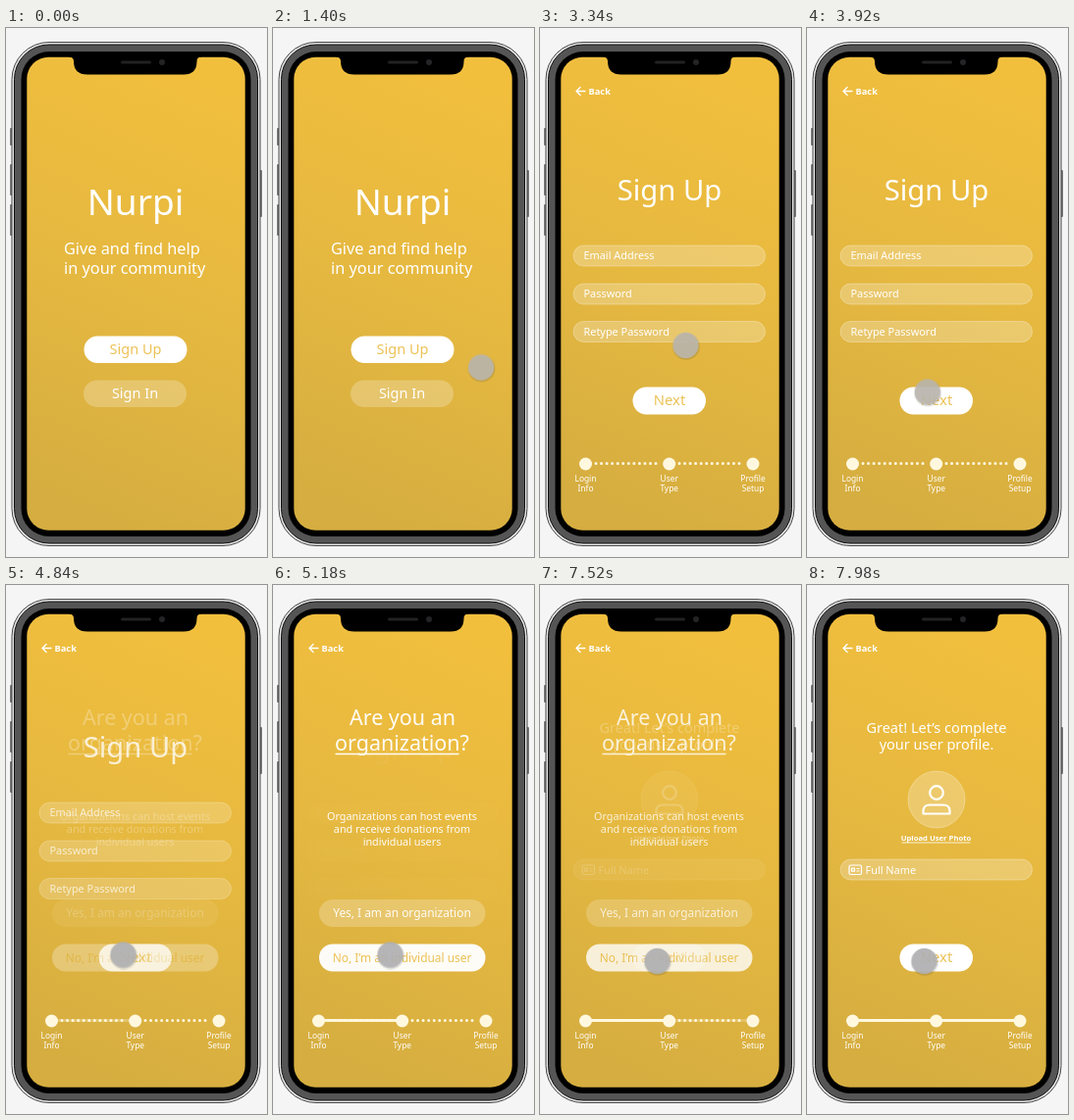
Animation of 266x540 px, one loop 8000 ms. Source, as an HTML page:

```html
<!DOCTYPE html>
<html lang="en">
<head>
<meta charset="utf-8">
<title>Sign-up flow</title>
<style>
  html, body { margin: 0; width: 100%; height: 100%; overflow: hidden; background: #f5f5f5; }
  svg { display: block; width: 100vw; height: 100vh; }
  text { font-family: "Noto Sans", sans-serif; fill: #fff; }
  .mid text, text.mid { text-anchor: middle; }
  .bold { font-family: "Open Sans", sans-serif; font-weight: 700; }
  text.gold { fill: #ecc255; }
  .solid { fill: #fff; }
  .soft { fill: #fff; fill-opacity: .24; }
  .field { fill: #fff; fill-opacity: .24; stroke: #fff; stroke-opacity: .38; stroke-width: .8; }
  .line { fill: none; stroke: #fff; stroke-linecap: round; stroke-linejoin: round; }
  .track { stroke: #fff8df; stroke-width: 3; stroke-linecap: round; }
  .dots { stroke-dasharray: 0 5.55; }

  .anim { animation: 8s linear infinite; }
  #welcome { animation-name: welcome; }
  #account { animation-name: account; }
  #kind { animation-name: kind; }
  #profile { animation-name: profile; }
  #nav { animation-name: nav; }
  #bar1 { animation-name: bar1; }
  #cursor { animation-name: move; }
  #cursor circle { animation-name: press; }

  @keyframes welcome { 0%, 26.875% { opacity: 1 } 30% { opacity: .6 } 33.125%, 100% { opacity: 0 } }
  @keyframes account {
    0%, 26.875% { opacity: 0 } 33.125%, 58.75% { opacity: 1 }
    61.875% { opacity: .6 } 65%, 100% { opacity: 0 }
  }
  @keyframes kind {
    0%, 58.75% { opacity: 0 } 65%, 92.5% { opacity: 1 }
    95.625% { opacity: .6 } 98.75%, 100% { opacity: 0 }
  }
  @keyframes profile { 0%, 92.5% { opacity: 0 } 98.75%, 100% { opacity: 1 } }
  @keyframes nav { 0%, 26.875% { opacity: 0 } 33.125%, 100% { opacity: 1 } }
  @keyframes bar1 { 0%, 58.75% { opacity: 0 } 65%, 100% { opacity: 1 } }
  @keyframes move {
    0%, 13.5% { transform: translate(284px, 372px); animation-timing-function: ease-in-out }
    21.25%, 43.75% { transform: translate(148.5px, 324px); animation-timing-function: ease-in-out }
    50.6%, 85% { transform: translate(119.5px, 377.5px); animation-timing-function: ease-in-out }
    90%, 100% { transform: translate(119.5px, 384px) }
  }
  @keyframes press {
    0%, 26% { fill: #bab6ae } 27.5%, 33% { fill: #b0b0b2 }
    36%, 57.5% { fill: #bab6ae } 59%, 100% { fill: #b0b0b2 }
  }
</style>
</head>
<body>
<svg viewBox="0 0 266 540" preserveAspectRatio="none">
  <defs>
    <linearGradient id="gold" x1=".6" y1="0" x2=".4" y2="1">
      <stop offset="0" stop-color="#f2bf3d"/>
      <stop offset=".5" stop-color="#e5b840"/>
      <stop offset="1" stop-color="#d5ad40"/>
    </linearGradient>
  </defs>

  <!-- Phone -->
  <g fill="#777">
    <rect x="4" y="102" width="3" height="18" rx="1"/>
    <rect x="4" y="139" width="3" height="32" rx="1"/>
    <rect x="4" y="180" width="3" height="32" rx="1"/>
    <rect x="258" y="145" width="3" height="48" rx="1"/>
  </g>
  <rect x="6" y="14.5" width="253" height="514" rx="38" fill="#e4e4e4" stroke="#444"/>
  <rect x="8.5" y="17" width="248" height="509" rx="35.5" fill="#555" stroke="#111"/>
  <rect x="15.5" y="24" width="234" height="495" rx="28.5"/>
  <rect x="21.3" y="29.8" width="222.4" height="482.9" rx="22"/>
  <rect x="21.3" y="29.8" width="222.4" height="482.9" rx="22" fill="url(#gold)"/>
  <path d="M64 28.5V29.5Q69 29.5 69 34Q69 47.5 83 47.5H181Q194.5 47.5 194.5 34Q194.5 29.5 199 29.5V28.5Z"/>
  <rect x="117" y="33.5" width="31" height="3" rx="1.5" fill="#222"/>
  <circle cx="159" cy="35" r="3" fill="#242426"/>

  <g id="welcome" class="anim">
    <text class="mid" x="132" y="191" font-size="37">Nurpi</text>
    <g font-size="16.3">
      <text x="59" y="231">Give and find help</text>
      <text x="59" y="250.5">in your community</text>
    </g>
    <rect class="solid" x="79.5" y="314.5" width="105" height="27.5" rx="13.75"/>
    <rect class="soft" x="79" y="359.5" width="105" height="27.5" rx="13.75"/>
    <g class="mid" font-size="14.5">
      <text class="gold" x="132" y="333">Sign Up</text>
      <text x="131.5" y="378">Sign In</text>
    </g>
  </g>

  <g id="nav" class="anim">
    <path class="line" stroke-width="1.4" d="M46 64.5H37M41 60.5L37 64.5L41 68.5"/>
    <text class="bold" x="49.5" y="68" font-size="9.3">Back</text>
    <path class="track dots" d="M57 444.5H122M142 444.5H208"/>
    <path id="bar1" class="track anim" d="M46.5 444.5H131.5"/>
    <g fill="#fff8df">
      <circle cx="46.5" cy="445" r="6.5"/>
      <circle cx="131.7" cy="445" r="6.5"/>
      <circle cx="217" cy="445" r="6.5"/>
    </g>
    <g class="mid" font-size="8.4">
      <text x="46.5" y="463">Login</text><text x="46.5" y="472.5">Info</text>
      <text x="131.7" y="463">User</text><text x="131.7" y="472.5">Type</text>
      <text x="217" y="463">Profile</text><text x="217" y="472.5">Setup</text>
    </g>
  </g>

  <g id="account" class="anim">
    <text class="mid" x="132" y="176" font-size="29.2">Sign Up</text>
    <rect class="field" x="34" y="222" width="195.5" height="21" rx="10.5"/>
    <rect class="field" x="34" y="261" width="195.5" height="21" rx="10.5"/>
    <rect class="field" x="34" y="299.5" width="195.5" height="21" rx="10.5"/>
    <g font-size="10.9">
      <text x="44.5" y="236.3">Email Address</text>
      <text x="44.5" y="275.3">Password</text>
      <text x="44.5" y="313.8">Retype Password</text>
    </g>
    <rect class="solid" x="94.5" y="366.5" width="74.5" height="28" rx="14"/>
    <text class="gold mid" x="132" y="385" font-size="14.8">Next</text>
  </g>

  <g id="kind" class="anim mid">
    <g font-size="21.5">
      <text x="132" y="143">Are you an</text>
      <text x="131.5" y="169">organization?</text>
    </g>
    <path class="line" stroke-width="1.3" d="M64 172.5H189"/>
    <g font-size="10.8">
      <text x="131.5" y="239.5">Organizations can host events</text>
      <text x="131.5" y="252.5">and receive donations from</text>
      <text x="131.5" y="265.5">individual users</text>
    </g>
    <rect class="soft" x="47" y="321" width="169.5" height="28" rx="14"/>
    <rect class="solid" x="47" y="366.5" width="169.5" height="28" rx="14"/>
    <g font-size="11.9">
      <text x="131.5" y="339">Yes, I am an organization</text>
      <text class="gold" x="131.5" y="384.5">No, I’m an individual user</text>
    </g>
  </g>

  <g id="profile" class="anim">
    <g class="mid" font-size="14.5">
      <text x="132" y="151">Great! Let’s complete</text>
      <text x="132" y="168">your user profile.</text>
    </g>
    <circle class="field" cx="132" cy="219" r="29"/>
    <g class="line" stroke-width="2.2">
      <circle cx="132" cy="212" r="6.8"/>
      <path d="M118.5 233.5V231Q118.5 224.5 125 224.5H139Q145.5 224.5 145.5 231V233.5Z"/>
    </g>
    <text class="mid bold" x="131.5" y="261" font-size="7.7">Upload User Photo</text>
    <path class="line" stroke-width=".8" d="M97 263H166"/>
    <rect class="field" x="34" y="280" width="195.5" height="21" rx="10.5"/>
    <g class="line" stroke-width="1.2">
      <rect x="43" y="286" width="12.5" height="9.5" rx="1.5"/>
      <path d="M45.5 289.2H48.5V292.2H45.5ZM51 289.5H53M51 292H53"/>
    </g>
    <text x="59.5" y="294.5" font-size="10.9">Full Name</text>
    <rect class="solid" x="94.5" y="366.5" width="74.5" height="28" rx="14"/>
    <text class="gold mid" x="132" y="385" font-size="14.8">Next</text>
    <path class="track" d="M46.5 444.5H217"/>
  </g>

  <g id="cursor" class="anim">
    <ellipse cx=".5" cy="1.2" rx="13.8" ry="13.6" fill="#000" opacity=".12"/>
    <circle class="anim" r="13.2" opacity=".9"/>
  </g>
</svg>
</body>
</html>
```
